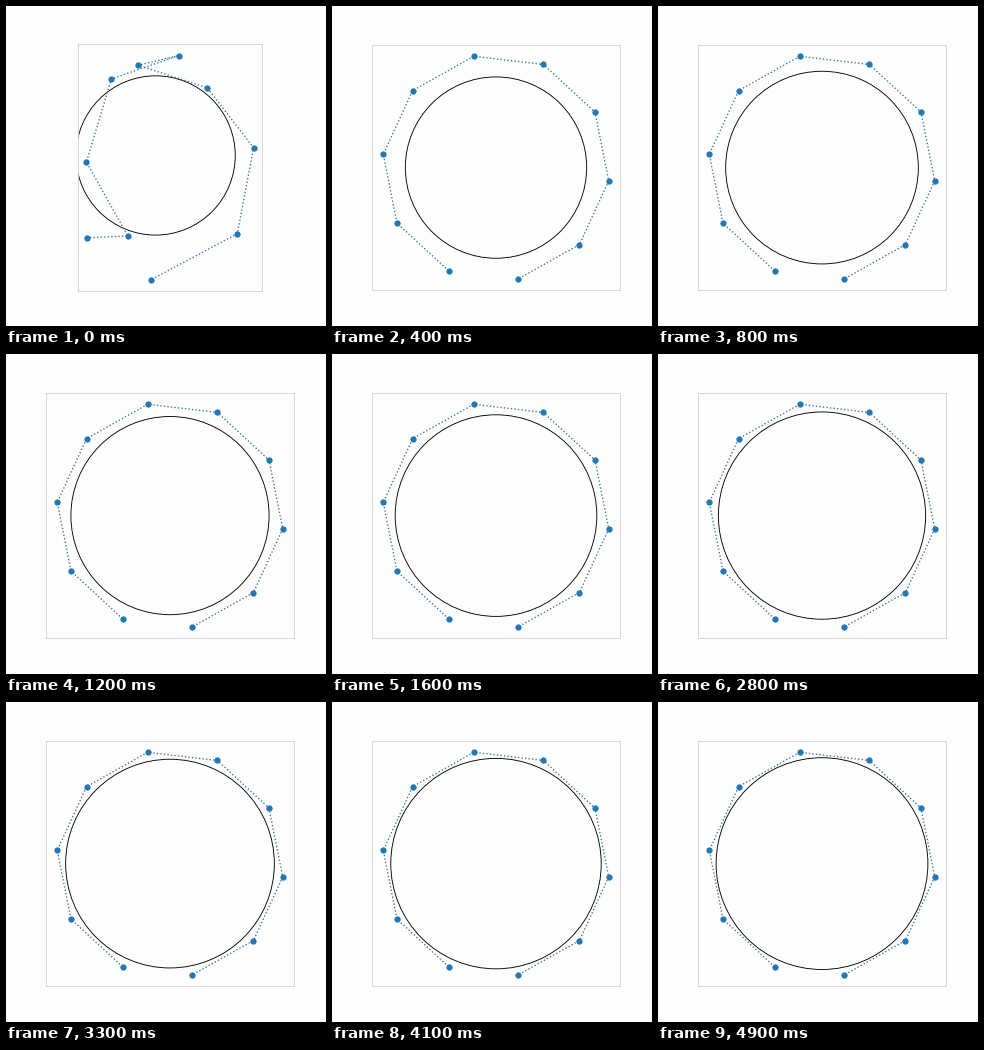
Write a matplotlib script that moves like this. It is 320x320 px and loops after 5 s.

```python
import numpy as np
import matplotlib.pyplot as plt
from matplotlib.animation import FuncAnimation

FRAMES, INTERVAL = 50, 100
SIDES = 10
FIRST_ANGLE = 245.3  # degrees, the chain then runs clockwise
MARGIN = 0.05
PAPER, DOT, LINK, FRAME = "#fefdfe", "#1f77b4", "#2b779f", "#cfcfd3"

INDEX = np.arange(SIDES)


def polar(radius, degrees):
    angles = np.radians(degrees)
    return radius * np.array([np.cos(angles), np.sin(angles)])


def loose_chain():
    """Doubles back twice, with a fading ripple and a far last point."""
    ripple = 0.3 * 0.85 ** INDEX * np.cos(INDEX * np.pi / 2)
    tail = 0.33 * (INDEX / (SIDES - 1)) ** 8
    degrees = np.interp(INDEX, [0, 1, 3, 4, 5, 9], [230, 251, 120, 77, 101, -92])
    return polar(1.05 + 0.02 * INDEX + ripple + tail, degrees)


def chain(step):
    """Start loose, then a regular polygon tightening around the circle."""
    if step == 0:
        return loose_chain()
    return polar(1 + 0.504 / np.sqrt(step), FIRST_ANGLE - INDEX * 360 / SIDES)


def padded(values):
    low, high = values.min(), values.max()
    pad = MARGIN * (high - low)
    return low - pad, high + pad


fig = plt.figure(figsize=(5, 5), dpi=64, facecolor=PAPER)
ax = fig.add_axes([0.125, 0.11, 0.775, 0.77], facecolor=PAPER)
ax.set_aspect("equal", adjustable="box")
ax.set(xticks=[], yticks=[])
for spine in ax.spines.values():
    spine.set(color=FRAME, linewidth=0.9)

ax.add_patch(plt.Circle((0, 0), 1, fill=False, edgecolor="black", linewidth=1))
line, = ax.plot([], [], ":", color=LINK, linewidth=1.5)
# A scatter keeps the dots at sub-pixel positions
dots = ax.scatter([], [], s=36, color=DOT, linewidth=1, zorder=3)


def draw(step):
    x, y = chain(step)
    line.set_data(x, y)
    dots.set_offsets(np.column_stack([x, y]))
    ax.set_xlim(padded(x))
    ax.set_ylim(padded(y))
    return line, dots


anim = FuncAnimation(fig, draw, frames=FRAMES, interval=INTERVAL,
                     init_func=lambda: draw(0), repeat=True, repeat_delay=0)
plt.show()
```
